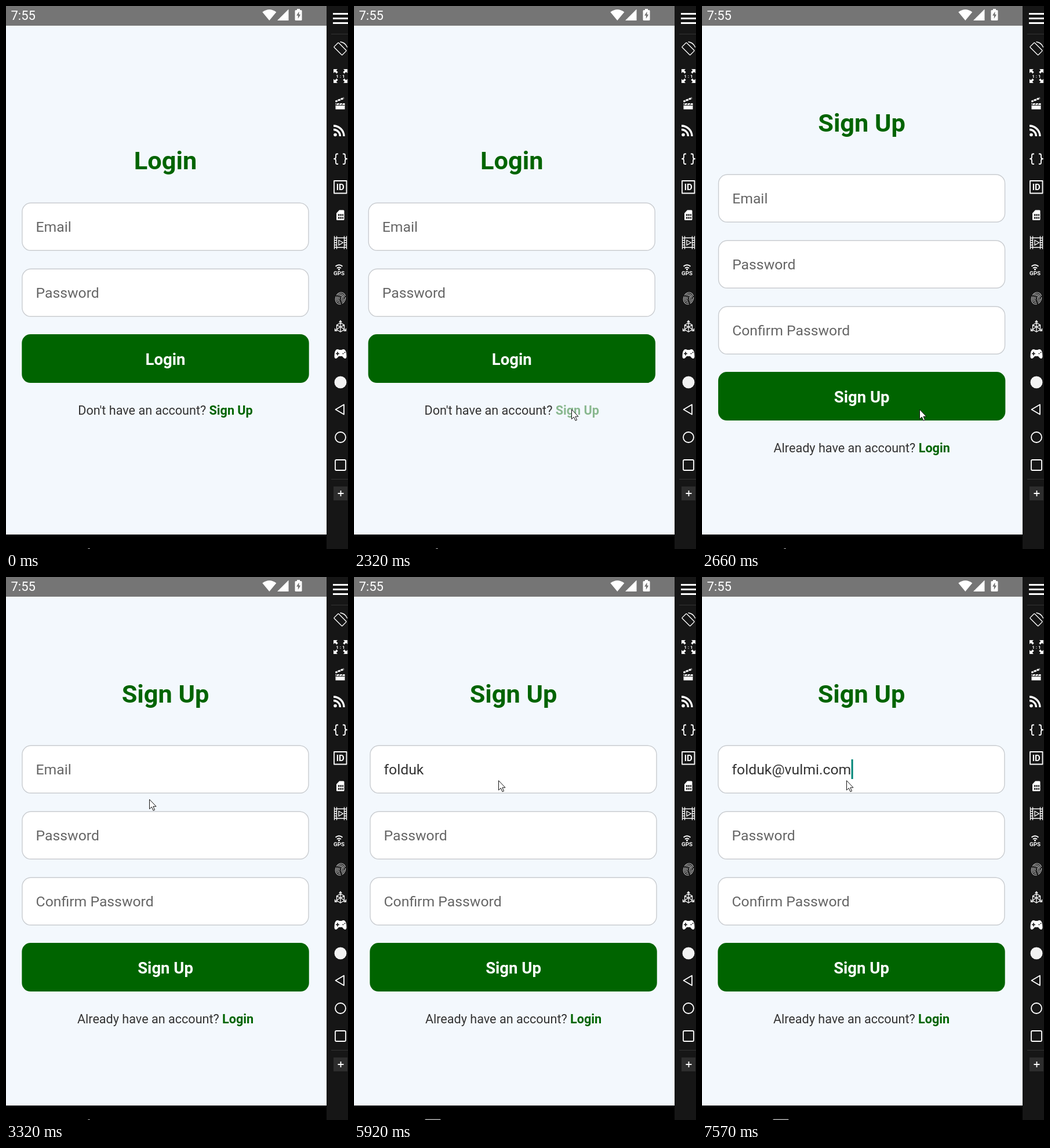
These frames come from a looping animation (590 px wide and 938 px high, 8 s). An HTML page:

```html
<!DOCTYPE html>
<html lang="en">
<head>
<meta charset="utf-8">
<title>Sign up flow</title>
<style>
  html, body { margin: 0; width: 100%; height: 100%; overflow: hidden; background: #161616; }
  svg { display: block; width: 100vw; height: 100vh; font-family: Roboto, sans-serif; }
  .title { font-size: 43.3px; font-weight: 700; fill: #006400; text-anchor: middle; }
  .field { fill: #fff; stroke: #c9ccd0; stroke-width: 1.4; }
  .input { font-size: 24.75px; fill: #333; }
  .hint { font-size: 24.75px; fill: #666; }
  .label { font-size: 27.5px; font-weight: 700; fill: #fff; text-anchor: middle; }
  .foot { font-size: 21.6px; fill: #333; text-anchor: middle; white-space: pre; }
  .link { font-weight: 700; fill: #006400; }
  .line { fill: none; stroke: #fff; stroke-width: 1.8; stroke-linejoin: round; }
  .thin { fill: none; stroke: #fff; stroke-width: 1.3; stroke-linecap: round; }
  .solid { fill: #fff; }
  .mark { font-weight: 700; fill: #fff; text-anchor: middle; }
</style>
</head>
<body>
<svg viewBox="0 0 590 938" preserveAspectRatio="none">
  <defs><clipPath id="phone"><rect width="553" height="938"/></clipPath></defs>
  <rect width="590" height="938" fill="#161616"/>
  <g clip-path="url(#phone)">
    <rect width="553" height="938" fill="#f3f8fd"/>
    <g id="login"></g>
    <g id="signup"></g>
    <rect width="553" height="34" fill="#757575"/>
    <text x="8.5" y="24" font-size="22" fill="#fff">7:55</text>
    <path class="solid" d="M454.3 25 442.3 10.5Q454.3 1.5 466.3 10.5ZM487.5 5.5V25H468ZM500 7h2V5h5v2h2q1.500 0 1.500 1.500v15q0 1.500-1.500 1.500h-9q-1.500 0-1.500-1.500v-15q0-1.500 1.500-1.500z"/>
    <path fill="#757575" d="M505.5 9.5 501 16.5h2.8v5.5l4.400-7.300h-2.700z"/>
    <rect y="913" width="553" height="25" fill="#000"/>
    <path id="back" d="M-15 0 7.5-12.5V12.5Z" fill="none" stroke="#b4b4b4" stroke-width="2" stroke-linejoin="round"/>
  </g>

  <g id="tools">
    <path d="M561 48.5h29M561 817.5h29" stroke="#343434"/>
    <path d="M564 13.5h26M564 21.5h26M564 29.5h26" stroke="#fff" stroke-width="3"/>

    <rect class="thin" x="-5.500" y="-10" width="11" height="20" rx="1" transform="translate(576.5 74) rotate(-45)"/>
    <path class="thin" d="M577 62q8 1 11.500 9"/>

    <g id="corners"></g>
    <text class="mark" x="577" y="124" font-size="8">1 : 1</text>

    <path class="solid" d="M568.5 168h16v10.5h-16zM568 163.5l14.5-6 1 3-14.8 6z"/>
    <path d="M571 162l2.5 3M576 160l2.5 3M581 158l2 3M571 168l-2 3M576 168l-2 3M581 168l-2 3M568.5 171.5h16" stroke="#161616" stroke-width="1.1"/>

    <circle class="solid" cx="568" cy="222.5" r="2.8"/>
    <path d="M565 213.5a11.5 11.5 0 0 1 11.5 11.5M565 207a18 18 0 0 1 18 18" fill="none" stroke="#fff" stroke-width="3.3"/>

    <path class="line" d="M573 255.5h-2q-2 0-2 2.5v3q0 3-3 3 3 0 3 3v3.5q0 2.5 2 2.5h2M581 255.5h2q2 0 2 2.5v3q0 3 3 3-3 0-3 3v3.5q0 2.5-2 2.5h-2"/>

    <rect class="line" x="566" y="302" width="21.5" height="21.5"/>
    <text class="mark" x="576.7" y="318" font-size="15">ID</text>

    <path class="solid" d="M575 352.5h7q1.500 0 1.500 1.500v14.500q0 1.500-1.500 1.500h-10.500q-1.500 0-1.500-1.500V358z"/>
    <path d="M573 361h9M573 366h9" stroke="#161616" stroke-width="3" stroke-dasharray="2.500 1"/>

    <path class="thin" d="M566.5 398v21.500M570.5 398v21.500M583.5 398v21.500M587.5 398v21.500M570.5 400.5h13M570.5 417h13M574 404.5l7.5 4.300-7.500 4.300z"/>
    <path d="M568.5 400v18M585.5 400v18" stroke="#fff" stroke-width="3" stroke-dasharray="1.500 2.500"/>

    <circle class="solid" cx="574.5" cy="455" r="1.6"/>
    <path class="line" d="M571 453q3.500-3 7 0M568.500 449.800q6-5 12 0"/>
    <text class="mark" x="574.5" y="464.5" font-size="9.8">GPS</text>

    <g id="print" fill="none" stroke="#c4c4c4" stroke-width="1.1" transform="rotate(20 577 505)"></g>

    <path class="thin" d="M577 544v10M577 554l-9.5 6.500M577 554l9.500 6.500M575 546l2-2.500 2 2.500M567.500 557.500v3.500h3.500M586.500 557.500v3.500h-3.500M570.500 551l6.500-3.500 6.500 3.500v8l-6.500 4-6.500-4zM570.500 551l6.500 3.500 6.500-3.500M577 554v9"/>

    <path class="solid" d="M571 593q2-.5 4 1h4q2-1.500 4-1 4.500 1.500 4.500 12 0 4-2.500 4-2 0-5-4h-6q-3 4-5 4-2.500 0-2.500-4 0-10.500 4.500-12z"/>
    <path d="M572 597.5v6M569 600.5h6M580.5 600.5h2M583.5 598.5h2" stroke="#161616" stroke-width="1.7"/>

    <circle cx="577" cy="650" r="10.5" fill="#f2f2f2"/>
    <path class="line" d="M568.5 697 583 688.5v17z"/>
    <circle class="line" cx="577" cy="745" r="9"/>
    <rect class="line" x="568" y="784" width="18" height="18" rx="2"/>
    <rect x="565" y="830" width="24" height="24" fill="#2d2d2d"/>
    <path class="line" d="M572.5 842h10M577.5 837v10"/>
  </g>
  <path id="mouse" d="M0 0V16.5L3.8 13 6.5 19.2 9 18.1 6.4 12.1H11.5Z" fill="#fff" stroke="#111"/>
</svg>

<script>
const $ = id => document.getElementById(id);
const LOOP = 8000, TICK = 66.4;
const EMAIL = 'folduk@vulmi.com', NAME_LENGTH = EMAIL.indexOf('@');

const field = (y, hint, id) => `
  <rect class="field" x="27.9" y="${y}" width="494" height="82" rx="15"/>
  <text class="hint" x="51.5" y="${y + 50}"${id ? ` id="${id}"` : ''}>${hint}</text>`;

function form({ title, top, hints, ask, link, hintId, linkId }) {
  const titleY = top + (hints.length > 2 ? -74 : -58);
  const buttonY = top + hints.length * 114;
  return `<rect width="553" height="938" fill="#f3f8fd"/>
    <text class="title" x="275" y="${titleY}">${title}</text>
    ${hints.map((h, i) => field(top + i * 114, h, i ? '' : hintId)).join('')}
    <rect x="27.3" y="${buttonY - 1.2}" width="495.4" height="84" rx="15" fill="#006400"/>
    <text class="label" x="275" y="${buttonY + 52}">${title}</text>
    <text class="foot" x="275" y="${buttonY + 137.5}">${ask} <tspan class="link" id="${linkId}">${link}</tspan></text>`;
}

$('login').innerHTML = form({
  title: 'Login', top: 340.3, hints: ['Email', 'Password'],
  ask: "Don't have an account?", link: 'Sign Up', hintId: 'loginHint', linkId: 'toSignup'
});
$('signup').innerHTML = form({
  title: 'Sign Up', top: 291.3, hints: ['Email', 'Password', 'Confirm Password'],
  ask: 'Already have an account?', link: 'Login', hintId: 'hint', linkId: 'toLogin'
}) + `<text class="input" id="typed" x="51.5" y="341.3"></text>
      <rect id="caret" y="315" width="3" height="34" fill="#008577"/>`;

$('corners').innerHTML = [0, 90, 180, 270].map(a =>
  `<path class="solid" transform="translate(577 121) rotate(${a})" d="M-12-12h7l-2.3 2.3 3 3-2.400 2.400-3-3L-12-5z"/>`).join('');

$('print').innerHTML = [1, 2, 3, 4].map(i =>
  `<ellipse cx="577" cy="505" rx="${i * 2.1}" ry="${i * 2.6}" stroke-dasharray="${i * 5} 2" stroke-dashoffset="${i * 3}"/>`).join('');

// Resting and turning points of the pointer: time, x, y.
const pointer = [
  [70, 520, 926], [600, 270, 478], [1000, 244, 508], [1330, 283.5, 564.3],
  [1665, 388, 717], [1930, 375.5, 697], [2660, 375.5, 697], [3200, 246, 410], [3460, 249.5, 351.7]
];

const ramp = (t, start, length) => Math.min(1, Math.max(0, (t - start) / length));
const smooth = p => p * p * (3 - 2 * p);

function pointerAt(t) {
  const i = Math.max(1, pointer.findIndex(k => k[0] > t));
  const [a, b] = t < 3460 ? [pointer[i - 1], pointer[i]] : pointer.slice(-2);
  const p = smooth(ramp(t, a[0], b[0] - a[0]));
  return [a[1] + (b[1] - a[1]) * p, a[2] + (b[2] - a[2]) * p];
}

// Sharp start with a long settling tail.
function slide(t) {
  const x = Math.pow(Math.max(0, t - 2310) / 50, 2.3);
  return x / (1 + x);
}

// The name and the domain are typed in two even bursts.
const strokeTime = i => i < NAME_LENGTH
  ? 4390 + 200 * i
  : 5980 + 1590 * (i - NAME_LENGTH) / (EMAIL.length - NAME_LENGTH - 1);
const strokes = [...EMAIL].map((_, i) => strokeTime(i));

function draw(t) {
  const s = Math.floor((t + 4) / TICK) * TICK;

  $('mouse').setAttribute('transform', `translate(${pointerAt(s)})`);
  $('mouse').style.display = t < 70 ? 'none' : '';

  const p = slide(s), shown = ramp(s, 2350, 83);
  $('login').setAttribute('transform', `translate(${-55 * p} 0)`);
  $('signup').setAttribute('transform', `translate(${55 * (1 - p)} 0)`);
  $('signup').style.opacity = shown;
  $('login').style.display = shown < 1 ? '' : 'none';
  $('toSignup').style.fillOpacity = 1 - .8 * (ramp(s, 2000, 150) - ramp(s, 2250, 250));

  const turn = ramp(s, 3720, 200);
  $('back').setAttribute('transform', `translate(136 ${950 - 5 * turn}) rotate(${-90 * turn})`);

  const n = strokes.filter(k => t >= k).length;
  $('typed').textContent = EMAIL.slice(0, n);
  $('hint').style.display = n ? 'none' : '';

  const idle = t - (n ? strokes[n - 1] : 3850);
  $('caret').setAttribute('x', 51.8 + (n ? $('typed').getComputedTextLength() : 0));
  $('caret').style.display = idle >= 0 && idle % 1000 < 520 ? '' : 'none';
}

function frame(now) {
  draw(now % LOOP);
  requestAnimationFrame(frame);
}
draw(0);
requestAnimationFrame(frame);
</script>
</body>
</html>
```
